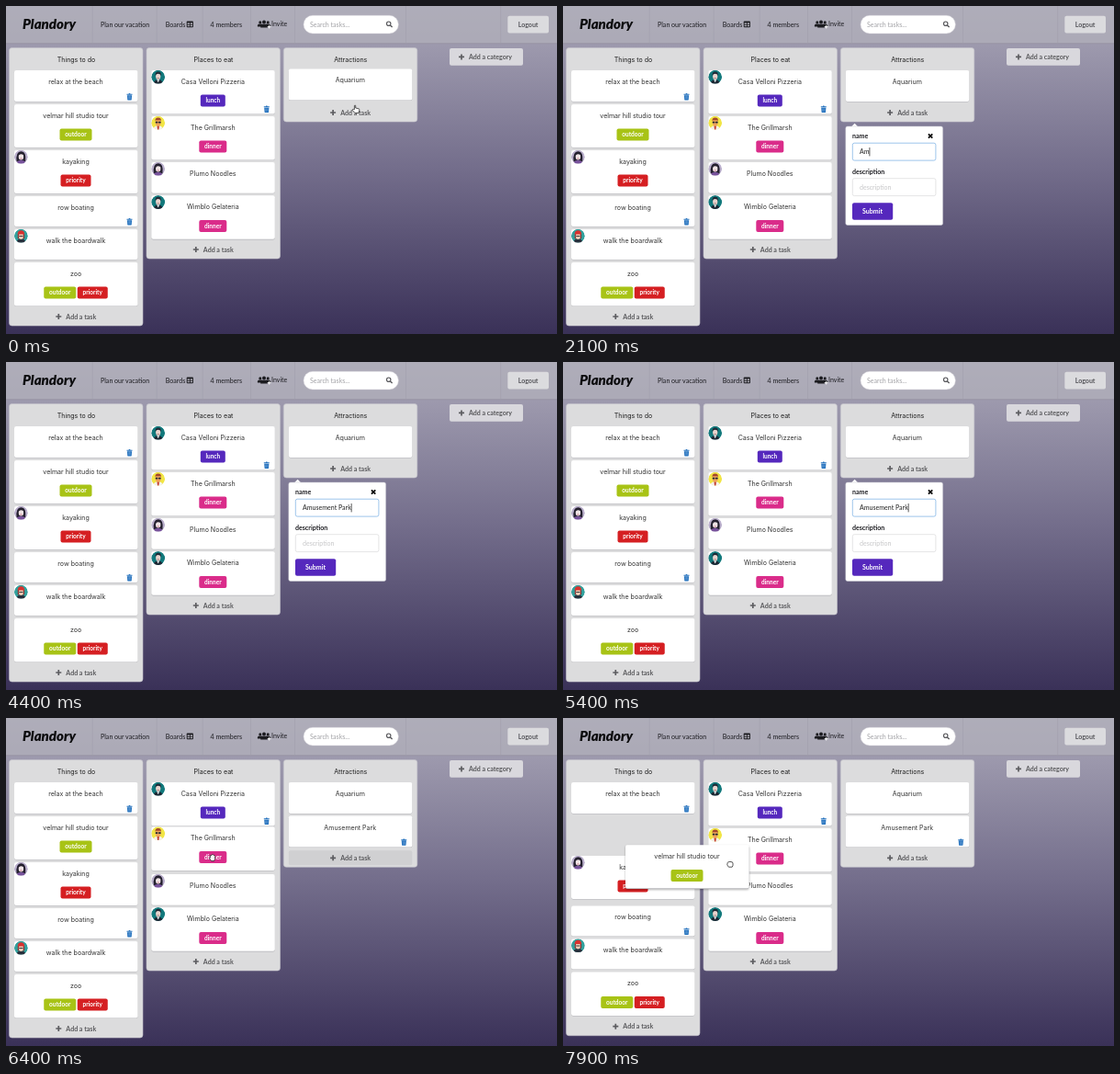
Animation, 600 px wide and 357 px high, one loop 8000 ms. Source, as an HTML page:

```html
<!DOCTYPE html>
<html lang="en">
<head>
<meta charset="utf-8">
<title>Task board</title>
<style>
  html, body { margin: 0; width: 100%; height: 100%; overflow: hidden; background: #3b3259; }
  svg { display: block; width: 100vw; height: 100vh; }
  text { font-family: Lato, sans-serif; font-size: 7.05px; fill: #333; white-space: pre; }
  .mid { text-anchor: middle; }
  .bold { font-weight: 700; }
  .task { font-family: Inter, sans-serif; font-size: 7.05px; }
  .tag { font-weight: 700; font-size: 6.5px; fill: #fff; }
  .brand { font-weight: 900; font-style: italic; font-size: 15px; fill: #0c0c0e; }
</style>
</head>
<body>
<svg id="stage" viewBox="0 0 600 357" preserveAspectRatio="none">
  <defs>
    <linearGradient id="sky" x1="0" y1="0" x2="0" y2="1">
      <stop offset="0" stop-color="#aaa7b8"/>
      <stop offset=".5" stop-color="#736d8b"/>
      <stop offset="1" stop-color="#3a3158"/>
    </linearGradient>
    <clipPath id="disc"><circle r="7.4"/></clipPath>
    <filter id="lift" x="-10%" y="-20%" width="120%" height="150%">
      <feDropShadow dx="0" dy="1" stdDeviation="1.2" flood-opacity=".3"/>
    </filter>
  </defs>
</svg>
<script>
const LOOP = 8000, STEP = 100;
const stage = document.getElementById('stage');

function add(parent, tag, attrs = {}, text) {
  const node = document.createElementNS('http://www.w3.org/2000/svg', tag);
  for (const key in attrs) node.setAttribute(key, attrs[key]);
  if (text !== undefined) node.textContent = text;
  parent.append(node);
  return node;
}
const group = (parent, attrs) => add(parent, 'g', attrs);
const box = (parent, x, y, width, height, fill, rx = 0, more) =>
  add(parent, 'rect', { x, y, width, height, fill, rx, ...more });
const path = (parent, d, fill, more) => add(parent, 'path', { d, fill, ...more });
const dot = (parent, cx, cy, r, fill) => add(parent, 'circle', { cx, cy, r, fill });
const label = (parent, x, y, text, cls = '', more) => add(parent, 'text', { x, y, class: cls, ...more }, text);
const move = (node, x, y) => node.setAttribute('transform', `translate(${x} ${y})`);
const show = (node, on) => node.setAttribute('visibility', on ? 'visible' : 'hidden');

// Icons
function plus(parent, x, y) {
  path(parent, `M${x - 3} ${y}h6M${x} ${y - 3}v6`, 'none', { stroke: '#5c5c60', 'stroke-width': 1.7 });
}
function bin(parent, x, y) {
  const g = group(parent, { transform: `translate(${x} ${y})` });
  path(g, 'M-3-3H-1L-.6-3.7H.6L1-3H3V-2H-3ZM-2.6-1.6H2.6L2.2 3.1Q2.1 3.6 1.6 3.6H-1.6Q-2.1 3.6-2.2 3.1Z', '#2270bd');
  path(g, 'M-1.1-.7V2.6M0-.7V2.6M1.1-.7V2.6', 'none', { stroke: '#8fb8e0', 'stroke-width': .4 });
}
const faces = {
  teal(g) {
    dot(g, 0, 0, 7.5, '#12797c');
    path(g, 'M-5 8Q-5 3 0 3T5 8Z', '#1c2733');
    path(g, 'M-1.5 3L0 6L1.5 3Z', '#e8eef0');
    add(g, 'ellipse', { cx: 0, cy: -.6, rx: 2.6, ry: 3.6, fill: '#e9d3cd' });
    path(g, 'M-3-1Q-3.8-5.6 0-5.8T3-1L2-3Q0-3.8-2-3Z', '#202a36');
    path(g, 'M-1.2 1.4H1.2', 'none', { stroke: '#7c4a4c', 'stroke-width': .6 });
  },
  yellow(g) {
    dot(g, 0, 0, 7.5, '#f1e544');
    path(g, 'M-6 8Q-5 3 0 3T6 8Z', '#f4f1ea');
    path(g, 'M-1.2 3H1.2L.6 8H-.6Z', '#c33a2c');
    add(g, 'ellipse', { cx: 0, cy: -.4, rx: 3, ry: 3.9, fill: '#eda35c' });
    path(g, 'M-3.2-1.6Q-3.6-5.8 0-5.8T3.2-1.6L2.4-3H-2.4Z', '#a4472a');
    box(g, -3, -1.5, 2.7, 1.7, '#222a30', .6);
    box(g, .3, -1.5, 2.7, 1.7, '#222a30', .6);
  },
  violet(g) {
    dot(g, 0, 0, 7.5, '#b9aecb');
    path(g, 'M-4.8 5Q-6-5.8 0-6T4.8 5Z', '#25212f');
    path(g, 'M-5 8Q-4.5 3.6 0 3.6T5 8Z', '#77529b');
    add(g, 'ellipse', { cx: 0, cy: -.2, rx: 2.7, ry: 3.6, fill: '#f1e5e6' });
    path(g, 'M-2.8-1Q-2-4 2.8-2.4L2.4-4.4H-2.4Z', '#25212f');
    path(g, 'M-.9 1.8H.9', 'none', { stroke: '#b23b5a', 'stroke-width': .7 });
  },
  red(g) {
    dot(g, 0, 0, 7.5, '#31a09c');
    path(g, 'M-5.4 8Q-5 3.4 0 3.4T5.4 8Z', '#27303c');
    path(g, 'M-3.6 3V-2H3.6V3Z', '#8c2a2c');
    add(g, 'ellipse', { cx: 0, cy: .4, rx: 2.6, ry: 3.4, fill: '#f0cdb6' });
    path(g, 'M-3.8-1.6Q-3.6-6 0-6T3.8-1.6Z', '#d8322f');
    path(g, 'M-2.2 .3H2.2', 'none', { stroke: '#2b2b33', 'stroke-width': .9 });
  }
};
const tags = {
  outdoor: ['#a8c316', 35], priority: ['#d51f22', 33],
  lunch: ['#5528bd', 27], dinner: ['#da2c8a', 30]
};

// Board parts; every card keeps its home position in its own group
function card(parent, x, y, h, title, { names = [], face, trash } = {}) {
  const g = group(parent);
  box(g, x, y + .6, 134.5, h, '#b4b4b8', 2);
  box(g, x, y, 134.5, h, '#fff', 2);
  label(g, x + 67, y + 14.9, title, 'mid task');
  const total = names.reduce((sum, n) => sum + tags[n][1], names.length * 1.5 - 1.5);
  let left = x + 67 - total / 2;
  for (const n of names) {
    const [fill, w] = tags[n];
    box(g, left, y + 26.6, w, 13, fill, 2);
    label(g, left + w / 2, y + 35.3, n, 'mid tag');
    left += w + 1.5;
  }
  if (trash) bin(g, x + 125.5, y + h - 5.2);
  if (face) {
    const spot = group(g, { transform: `translate(${x + 7.4} ${y + 7.2})` });
    faces[face](group(spot, { 'clip-path': 'url(#disc)' }));
  }
  return g;
}
function column(x, bottom, title) {
  const g = group(stage);
  const panel = box(g, x, 45.5, 145.5, bottom - 45.5, '#dcdcdd', 3, { stroke: '#c3c2c9', 'stroke-width': .6 });
  label(g, x + 73, 61.4, title, 'mid task', { style: 'fill:#1e1e1e' });
  const foot = group(g);
  const hover = box(foot, x + 5.5, bottom - 18, 134.5, 16, '#d0d0d2', 2, { visibility: 'hidden' });
  plus(foot, x + 53.8, bottom - 10);
  label(foot, x + 78.3, bottom - 7.4, 'Add a task', 'mid bold', { style: 'fill:#58585b' });
  return { g, panel, foot, hover, bottom };
}
function fit(col, shift) {
  col.panel.setAttribute('height', col.bottom - 45.5 + shift);
  move(col.foot, 0, shift);
}

// Backdrop and top bar
box(stage, 0, 0, 600, 357, 'url(#sky)');
const bar = group(stage);
box(bar, 0, 0, 600, 41, '#b1afba', 0, { opacity: .75 });
box(bar, 0, 40.5, 600, .7, '#8f8c9c');
for (const x of [93.8, 163.8, 213.8, 266, 314, 435, 538.5]) box(bar, x, 0, .6, 40.5, '#a19eac');
label(bar, 47, 25, 'Plandory', 'mid brand');
const dark = { style: 'fill:#1c1c20' };
label(bar, 103, 22.5, 'Plan our vacation', '', dark);
label(bar, 173.8, 22.5, 'Boards', '', dark);
box(bar, 196.7, 16.6, 7.2, 6.6, '#1c1c20', .8);
for (const x of [197.6, 200.7]) for (const y of [18.4, 20.7]) box(bar, x, y, 2.3, 1.5, '#b1afba');
label(bar, 222.5, 22.5, '4 members', '', dark);
for (const [x, y, s] of [[276.8, 19, .75], [285.2, 19, .75], [281, 19, 1]]) {
  const g = group(bar, { transform: `translate(${x} ${y}) scale(${s})` });
  dot(g, 0, -1.6, 2, '#1c1c20');
  path(g, 'M-3.8 4.6V3Q-3.8 .7-1.6 .7H1.6Q3.8 .7 3.8 3V4.6Z', '#1c1c20');
}
path(bar, 'M284.8 22.6h3.8M286.7 20.7v3.8', 'none', { stroke: '#fff', 'stroke-width': .9 });
label(bar, 289, 22, 'Invite', '', dark);
box(bar, 324, 10.3, 103.4, 19.6, '#fff', 9.8, { stroke: '#d6d5da', 'stroke-width': .5 });
label(bar, 331, 22.5, 'Search tasks...', '', { style: 'fill:#a2a2a6' });
add(bar, 'circle', { cx: 416.7, cy: 19.2, r: 2.2, fill: 'none', stroke: '#5a5a5e', 'stroke-width': 1.2 });
path(bar, 'M418.4 20.9L420.6 23.1', 'none', { stroke: '#5a5a5e', 'stroke-width': 1.4 });
box(bar, 546.3, 10.8, 44.7, 18.8, '#dbdbde', 2);
label(bar, 568.6, 22.6, 'Logout', 'mid bold', { style: 'fill:#55555a' });
box(stage, 483, 46, 80, 18.8, '#d9d8dd', 2);
plus(stage, 496, 55.4);
label(stage, 527.5, 57.9, 'Add a category', 'mid bold', { style: 'fill:#58585b' });

const todo = column(3.5, 348, 'Things to do');
const eat = column(153, 275, 'Places to eat');
const fun = column(302.3, 126, 'Attractions');
card(todo.g, 9, 70, 34, 'relax at the beach', { trash: true });
const below = [
  card(todo.g, 9, 157, 47, 'kayaking', { names: ['priority'], face: 'violet' }),
  card(todo.g, 9, 207, 33, 'row boating', { trash: true }),
  card(todo.g, 9, 243, 33, 'walk the boardwalk', { face: 'red' }),
  card(todo.g, 9, 279, 47.5, 'zoo', { names: ['outdoor', 'priority'] })
];
card(eat.g, 158.3, 70, 47.5, 'Casa Velloni Pizzeria', { names: ['lunch'], face: 'teal', trash: true });
const grill = card(eat.g, 158.3, 120, 47.5, 'The Grillmarsh', { names: ['dinner'], face: 'yellow' });
card(eat.g, 158.3, 170, 33.7, 'Plumo Noodles', { face: 'violet' });
card(eat.g, 158.3, 206.3, 47.5, 'Wimblo Gelateria', { names: ['dinner'], face: 'teal' });
const fish = card(fun.g, 307.8, 70, 34, 'Aquarium');
const park = card(fun.g, 307.8, 106.6, 33.8, 'Amusement Park', { trash: true });
const held = card(stage, 9, 107, 47, 'velmar hill studio tour', { names: ['outdoor'] });

// New task form
const form = group(stage);
path(form, 'M313.8 131.5L317.6 127.8L321.4 131.5Z', '#fff');
box(form, 307.8, 131, 105.8, 107.5, '#fff', 2, { stroke: '#c9c8d0', 'stroke-width': .5 });
label(form, 315, 144.2, 'name', 'bold', dark);
path(form, 'M397.9 139.3l4.4 4.4m0-4.4l-4.4 4.4', 'none', { stroke: '#0c0c0c', 'stroke-width': 1.8 });
const field = box(form, 315.3, 149.2, 90.6, 18.9, '#fff', 2, { 'stroke-width': .8 });
const entry = label(form, 323, 161.2, '', '', { 'xml:space': 'preserve' });
const caret = box(form, 323, 154, .7, 9.4, '#111');
label(form, 315, 183, 'description', 'bold', dark);
box(form, 315.3, 187.7, 90.6, 18.9, '#fff', 2, { stroke: '#dededf', 'stroke-width': .8 });
label(form, 323, 199.7, 'description', '', { style: 'fill:#c6c6c8' });
box(form, 315, 214.2, 44.2, 18.6, '#5528bd', 2);
label(form, 337.1, 226, 'Submit', 'mid bold', { style: 'fill:#fff' });

// Pointers, drawn around their centre
const ink = { stroke: '#111', 'stroke-width': .7, 'stroke-linejoin': 'round' };
const pointers = {
  point: 'M-1.6 .6V-3.6Q-1-4.6-.3-3.6V-1L3.2-.2Q4 0 3.8 1.2L3 4.4H-1.2L-3.8 1.3Q-3.6 .1-2.6 .4Z',
  grab: 'M-2.6 .2V-2.4Q-2-3.2-1.4-2.4Q-1-4-.2-3.1Q.6-3.9 1.2-2.6Q2.4-3 2.5-1.6V1.4L1.6 3.6H-1.4L-3.6 .6Q-3.4-.4-2.6 .2Z',
  fist: 'M-2.8-1.4Q-2.4-2.8-1.2-2.3Q0-3.1 1-2.3Q2.8-2.8 3-.8V1.4L2.2 3.2H-1.6L-3.2 .9Z'
};
for (const key in pointers) pointers[key] = path(stage, pointers[key], '#fff', ink);
path.call(null, pointers.fist, '', '');
pointers.beam = path(stage, 'M-1.6-4Q0-4 0-3Q0-4 1.6-4M0-3V3M-1.6 4Q0 4 0 3Q0 4 1.6 4', 'none', { stroke: '#111', 'stroke-width': .9 });

// Time, x, y of the pointer
const route = [
  [0, 381, 112], [100, 378, 116], [600, 378, 116], [1000, 368, 159], [6000, 368, 159],
  [6200, 352, 154], [6400, 225, 152], [6800, 140, 130], [7000, 123, 128], [7700, 123, 128], [7900, 182, 159]
];
// Time at which the text has grown to its next letter
const keys = [1900, 2100, 2300, 2400, 2600, 2700, 2900, 3000, 3200, 3300, 3600, 3800, 4000, 4300];
const OPEN = 600, FOCUS = 1000, SEND = 6000, DRAG = 7800;

function pointerAt(t) {
  const i = Math.max(1, route.findIndex(p => p[0] >= t));
  const [t0, x0, y0] = route[i - 1], [t1, x1, y1] = route[i];
  const k = (t - t0) / (t1 - t0);
  return [x0 + (x1 - x0) * k, y0 + (y1 - y0) * k];
}

function draw(t) {
  const [px, py] = pointerAt(t);
  const sent = t >= SEND, drag = t >= DRAG;

  move(fish, 0, t < 100 ? -1.6 : 0);
  move(grill, 0, t >= 6300 && t < 6700 ? -1.5 : 0);
  show(park, sent);
  fit(fun, sent ? 36.3 : 0);
  show(fun.hover, t >= 6100 && t < 6500);

  const open = t >= OPEN && !sent;
  form.style.display = open ? '' : 'none';
  if (open) {
    const count = keys.filter(k => k <= t).length;
    const focused = t >= FOCUS;
    const last = count ? keys[count - 1] : FOCUS;
    field.setAttribute('stroke', focused ? '#85b7e6' : '#dededf');
    entry.textContent = count ? 'Amusement Park'.slice(0, count) : 'Task name';
    entry.style.fill = count ? '#222' : focused ? '#8c8c90' : '#c6c6c8';
    caret.setAttribute('x', 323 + (count ? entry.getComputedTextLength() : 0));
    show(caret, focused && Math.floor((t - last) / 500) % 2 === 0);
  }

  // The list closes up as the held card leaves it
  move(held, drag ? px - 123 : 0, drag ? py - 128 + .3 : t >= 6900 ? -1.5 : 0);
  if (drag) held.setAttribute('filter', 'url(#lift)');
  else held.removeAttribute('filter');
  below.forEach((c, i) => move(c, 0, !drag ? 0 : i === 0 && t > DRAG ? -7 : -2.5));
  fit(todo, drag ? -2.3 : 0);

  const kind = t < 800 ? 'point' : t < keys[0] ? 'beam' : !sent ? '' : drag ? 'fist' : t < 6300 ? 'point' : 'grab';
  for (const key in pointers) {
    show(pointers[key], key === kind);
    move(pointers[key], px, py);
  }
}

const start = performance.now();
function tick() {
  const t = (performance.now() - start) % LOOP;
  draw(Math.floor(t / STEP) * STEP);
  requestAnimationFrame(tick);
}
draw(0);
requestAnimationFrame(tick);
</script>
</body>
</html>
```
